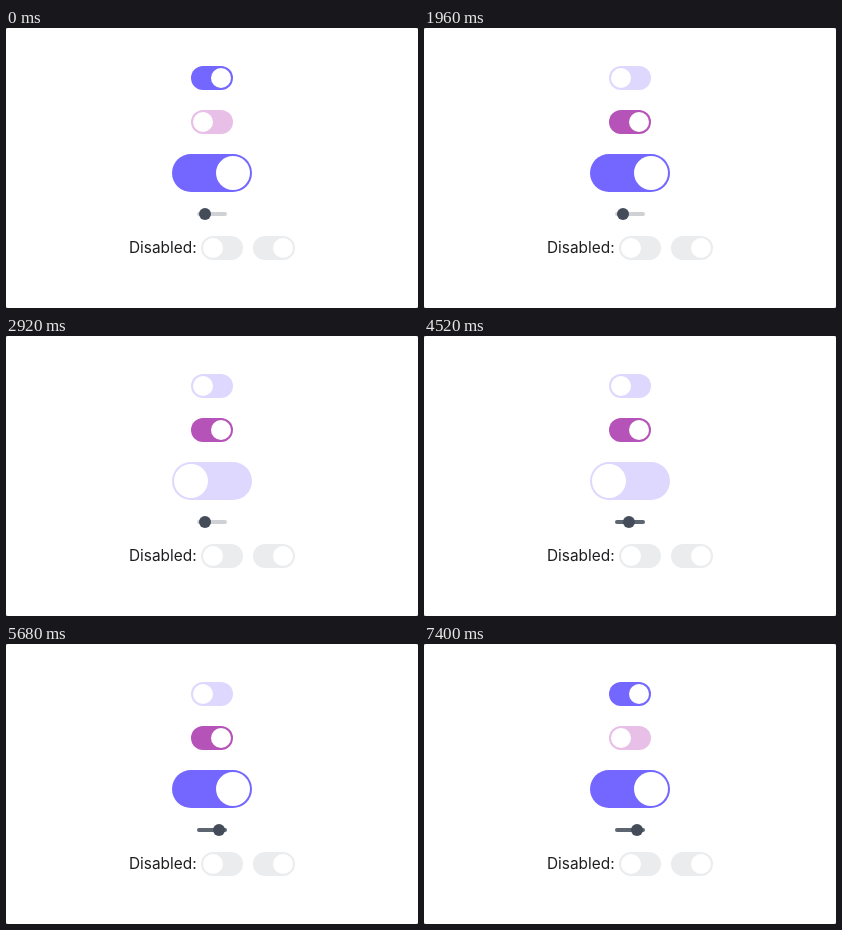
Recreate the animation shown at these times as an HTML page. Size 412 by 280 pixels, loop 8.28 s.

```html
<!DOCTYPE html>
<html lang="en">
<head>
<meta charset="utf-8">
<title>Toggle switches</title>
<style>
  html, body { margin: 0; width: 100%; height: 100%; overflow: hidden; background: #8a8a8a; }
  .stage { position: relative; width: 412px; height: 280px; border-radius: 2px; background: #fff; }

  .switch {
    position: absolute; left: var(--x); top: var(--y);
    width: var(--w, 42px); height: var(--h, 24px);
    border-radius: 99px; background: var(--on);
    --shift: calc(var(--w, 42px) - var(--h, 24px));
  }
  .switch i {
    position: absolute; left: 2px; top: 2px;
    width: calc(var(--h, 24px) - 4px); height: calc(var(--h, 24px) - 4px);
    border-radius: 50%; background: #fff;
  }
  .right i { transform: translateX(var(--shift)); }

  .violet { --on: #7367ff; --off: #ded8fe; }
  .orchid { --on: #b653b8; --off: #e8bfe6; }
  .large { --w: 80px; --h: 38px; }
  .disabled { --on: #ebecee; }

  .slim { --shift: 14px; --on: #5c6570; --off: #cfd1d4; --w: 30px; --h: 4px; }
  .slim i { left: 2px; top: -4px; width: 12px; height: 12px; background: #434c58; }

  .label {
    position: absolute; left: 123px; top: 208px;
    font: 15.4px/24px Inter, "Liberation Sans", sans-serif; color: #1e1e20;
    white-space: nowrap;
  }

  /* Tracks recolour at once; knobs glide after. */
  .track { animation: 8280ms step-end infinite; }
  .track i { animation: 8280ms ease infinite; }
  .a { animation-name: track-a; }  .a i { animation-name: knob-a; }
  .b { animation-name: track-b; }  .b i { animation-name: knob-b; }
  .c { animation-name: track-c; }  .c i { animation-name: knob-c; }
  .d { animation-name: track-d; }  .d i { animation-name: knob-d; }

  @keyframes track-a {
    0%, 86.956%, 100% { background: var(--on); }
    9.661% { background: var(--off); }
  }
  @keyframes knob-a {
    0%, 9.661%, 89.372%, 100% { transform: translateX(var(--shift)); }
    11.594%, 86.956% { transform: none; }
  }
  @keyframes track-b {
    0%, 82.608%, 100% { background: var(--off); }
    21.739% { background: var(--on); }
  }
  @keyframes knob-b {
    0%, 21.739%, 85.024%, 100% { transform: none; }
    23.671%, 82.608% { transform: translateX(var(--shift)); }
  }
  @keyframes track-c {
    0%, 66.666%, 100% { background: var(--on); }
    33.333% { background: var(--off); }
  }
  @keyframes knob-c {
    0%, 33.333%, 68.599%, 100% { transform: translateX(var(--shift)); }
    35.265%, 66.666% { transform: none; }
  }
  @keyframes track-d {
    0% { background: var(--off); }
    54.106%, 100% { background: var(--on); }
  }
  @keyframes knob-d {
    0%, 54.106% { transform: none; }
    56.038%, 100% { transform: translateX(var(--shift)); }
  }
</style>
</head>
<body>
<div class="stage">
  <div class="switch track a violet" style="--x:185px;--y:38px"><i></i></div>
  <div class="switch track b orchid" style="--x:185px;--y:82px"><i></i></div>
  <div class="switch track c violet large" style="--x:166px;--y:126px"><i></i></div>
  <div class="switch track d slim" style="--x:191px;--y:184px"><i></i></div>
  <span class="label">Disabled:</span>
  <div class="switch disabled" style="--x:195px;--y:208px"><i></i></div>
  <div class="switch disabled right" style="--x:247px;--y:208px"><i></i></div>
</div>
</body>
</html>
```
